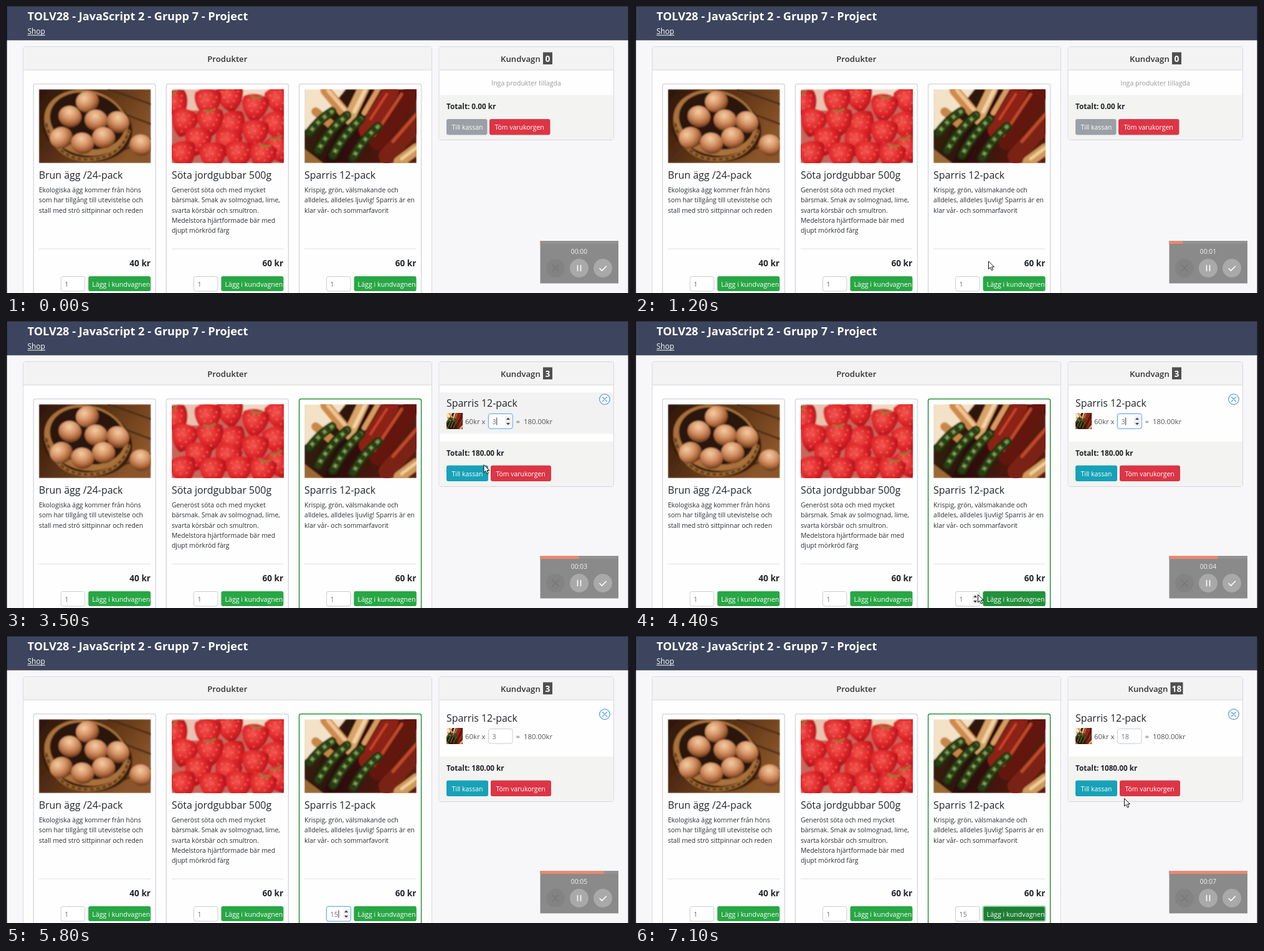
Write an HTML page that moves like this. It is 1000 by 462 pixels and loops after 7.2 s.

```html
<!DOCTYPE html>
<html lang="sv">
<head>
<meta charset="utf-8">
<title>Shop</title>
<style>
html, body { margin: 0; width: 100%; height: 100%; overflow: hidden; background: #f7f7fa; }
svg { display: block; width: 100vw; height: 100vh; }
text { font-family: "Open Sans", "Noto Sans", sans-serif; white-space: pre; }
</style>
</head>
<body>
<svg viewBox="0 0 1000 462">
  <defs>
    <clipPath id="photo"><rect width="180" height="119"/></clipPath>
    <filter id="soft"><feGaussianBlur stdDeviation=".9"/></filter>
    <linearGradient id="wood" x2="1" y2=".5"><stop stop-color="#2c1509"/><stop offset=".5" stop-color="#5b3215"/><stop offset="1" stop-color="#8a5529"/></linearGradient>
    <radialGradient id="egg" cx=".4" cy=".3" r=".7"><stop stop-color="#f3cda4"/><stop offset=".45" stop-color="#d8976a"/><stop offset=".75" stop-color="#b06b40"/><stop offset="1" stop-color="#6d3a1c"/></radialGradient>
    <radialGradient id="berry" cx=".4" cy=".35" r=".65"><stop stop-color="#f4574f"/><stop offset=".6" stop-color="#dd2428"/><stop offset="1" stop-color="#a8121a"/></radialGradient>
    <linearGradient id="pan" x2="1" y2=".3"><stop stop-color="#3d2a10"/><stop offset=".5" stop-color="#2a0d06"/><stop offset="1" stop-color="#5a1d0f"/></linearGradient>
  </defs>
  <g id="page"></g>
  <g id="live"></g>
</svg>
<script>
const INK = '#212529', GREEN = '#28a745';
const $ = id => document.getElementById(id);

const text = (x, y, s, size, fill = INK, weight = 400, anchor = 'start') =>
  `<text x="${x}" y="${y}" font-size="${size}" fill="${fill}" font-weight="${weight}" text-anchor="${anchor}">${s}</text>`;
const rect = (x, y, w, h, fill, more = '') =>
  `<rect x="${x}" y="${y}" width="${w}" height="${h}" fill="${fill}" ${more}/>`;
const box = (x, y, w, h, fill, edge, width = 1) =>
  rect(x, y, w, h, fill, `rx="3" stroke="${edge}" stroke-width="${width}"`);
const path = (d, stroke, width, more = '') =>
  `<path d="${d}" fill="none" stroke="${stroke}" stroke-width="${width}" stroke-linecap="round" ${more}/>`;
const oval = (x, y, rx, ry, fill, turn = 0) =>
  `<ellipse rx="${rx}" ry="${ry}" fill="${fill}" transform="translate(${x} ${y}) rotate(${turn})"/>`;
const button = (x, y, w, s, fill, pad = 8.5) =>
  rect(x, y, w, 25.5, fill, 'rx="3"') + text(x + pad, y + 17, s, 10.45, '#fff');

function eggs() {
  const list = [[78, 20, -15], [50, 44, 20], [92, 50, 15], [127, 53, 30],
    [36, 78, -20], [104, 78, 10], [70, 87, 15], [164, 90, 20]];
  return rect(0, 0, 180, 119, 'url(#wood)') +
    path('M112 0L180 24M132 38L180 56M100 112L180 80', '#4a2a12', 2.5) +
    oval(77, 60, 74, 55, '#3a1d0b', 14) + oval(76, 54, 68, 52, '#a9713a', 14) +
    oval(78, 51, 61, 45, '#2b1408', 14) +
    path('M12 56Q26 112 78 113Q130 112 144 68', '#a06b35', 6) +
    path('M12 56Q26 112 78 113Q130 112 144 68', '#54300f', 3, 'stroke-dasharray="4 6"') +
    list.map(([x, y, a]) => oval(x, y, 18.5, 17, 'url(#egg)', a)).join('');
}

function berries() {
  const list = [[6, 22], [172, 16], [94, 12], [58, 20], [134, 28], [20, 52], [98, 56], [168, 56],
    [62, 50], [134, 70], [42, 82], [90, 84], [172, 94], [18, 104], [66, 106], [108, 104], [146, 106]];
  return rect(0, 0, 180, 119, '#c9655a') + rect(0, 0, 44, 34, '#e9c3b0') + rect(105, 0, 75, 16, '#efd9c4') +
    list.map(([x, y], i) => `<g transform="translate(${x} ${y}) rotate(${i * 47 % 40 - 20}) scale(1.25)">` +
      '<path d="M0 21C-14 14-20-4-16-12Q0-21 16-12C20-4 14 14 0 21Z" fill="url(#berry)"/>' +
      path('M-10-7h.1M-3-9h.1M4-9h.1M11-6h.1M-8 0h.1M0-2h.1M8 0h.1M-4 6h.1M4 6h.1M0 13h.1', '#f3937a', 1.5) +
      (i % 4 ? '' : path('M-7-13L0-11L7-14', '#6f8638', 2)) + '</g>').join('');
}

function asparagus() {
  const stalk = (x, y, dx, dy) => {
    const d = `M${x} ${y}q${dx * .4} ${dy * .6} ${dx} ${dy}`;
    return path(d, '#1f3010', 15) + path(d, '#55742f', 8) +
      path(d, '#93a960', 3) + path(d, '#2a3d18', 8, 'stroke-dasharray="1 13"');
  };
  return rect(0, 0, 180, 119, 'url(#pan)') +
    '<path d="M0 0H66L34 40L0 66Z" fill="#f3e2c8"/><path d="M0 96L30 119H0Z" fill="#9a6a34"/>' +
    path('M18 36L44 58', '#c98746', 14) + path('M34 2L74 50', '#cf8a4c', 17) + path('M38 2L72 42', '#edc592', 6) +
    path('M94 0L72 46', '#d9a468', 18) + path('M98 0L80 36', '#f0d3a6', 6) +
    path('M138 4L100 66', '#8c2013', 26) + path('M172 4L118 84', '#64170d', 28) +
    path('M180 54L132 108', '#7a2412', 26) + path('M118 0L96 38', '#d99a5e', 8) +
    path('M156 8L112 74M180 40L142 84', '#c04a2b', 5) + path('M132 8L106 48', '#c8452c', 4) +
    stalk(8, 70, 36, -34) + stalk(22, 98, 46, -56) + stalk(46, 106, 44, -58) + stalk(78, 110, 40, -50) +
    path('M152 117L180 96', '#cf9a5c', 18) + path('M156 112L180 94', '#efcf9c', 5);
}

const photos = [eggs, berries, asparagus];
const products = [
  ['Brun ägg /24-pack', 40, 'Ekologiska ägg kommer från höns|som har tillgång till utevistelse och|stall med strö sittpinnar och reden'],
  ['Söta jordgubbar 500g', 60, 'Generöst söta och med mycket|bärsmak. Smak av solmognad, lime,|svarta körsbär och smultron.|Medelstora hjärtformade bär med|djupt mörkröd färg'],
  ['Sparris 12-pack', 60, 'Krispig, grön, välsmakande och|alldeles, alldeles ljuvlig! Sparris är en|klar vår- och sommarfavorit']
];

const cardX = i => 44.2 + 213.2 * i;

function card([name, price, about], i) {
  const x = cardX(i), left = x + 8.5, right = x + 187.8;
  return box(x, 125.5, 196, 360, '#fefefe', '#d6d7de', 1.4) +
    `<g id="photo${i}" transform="translate(${left} 134)"><g clip-path="url(#photo)"><g filter="url(#soft)">${photos[i]()}</g></g></g>` +
    text(left, 278, name, 15.95) +
    about.split('|').map((s, n) => text(left, 300 + 16.3 * n, s, 10.45, '#2b2f33')).join('') +
    rect(left, 390.5, 179.5, 1, '#e0e0e2') +
    text(right, 419, price + ' kr', 13.6, INK, 700, 'end') +
    field(x + 44, 435.5, 1) + buyButton(i, GREEN);
}

function buyButton(i, fill, more = '') {
  const x = cardX(i) + 88;
  return rect(x, 435, 100, 24, fill, 'rx="3" ' + more) + text(x + 6, 452, 'Lägg i kundvagnen', 10.7, '#fff');
}

function field(x, y, value, focus, arrows) {
  const w = 38.5, s = String(value), ax = x + w - 7;
  return (focus ? box(x, y, w, 23.5, 'none', '#cfe4fb', 3) : '') +
    box(x, y, w, 23.5, '#fff', focus ? '#6faee8' : '#c9cdd2') +
    text(x + 6, y + 16.5, s, 10.8, '#6a7178') +
    (focus ? rect(x + 6.5 + 6.2 * s.length, y + 6, 1, 12, '#333') : '') +
    (arrows ? rect(ax - 5, y + 4, 10, 16, '#efefef') +
      `<path d="M${ax - 3} ${y + 9.5}l3-3.5 3 3.5zM${ax - 3} ${y + 14.5}l3 3.5 3-3.5z" fill="#444"/>` : '');
}

$('page').innerHTML = rect(0, 0, 1000, 462, '#f7f7fa') + rect(0, 0, 1000, 55, '#3c455d') +
  rect(0, 55, 1000, 1, '#c9ccd6') + rect(0, 0, 1000, 1, '#23283a') +
  rect(0, 0, 1.5, 462, '#0c0c10') + rect(998.6, 0, 1.4, 462, '#15161c') +
  text(34.5, 23, 'TOLV28 - JavaScript 2 - Grupp 7 - Project', 18.15, '#fff', 700) +
  text(34.5, 45, 'Shop', 11.9, '#fff') + rect(34.5, 46.5, 28.5, 1, '#fff') +
  box(27.5, 65.5, 656, 420, '#fefefe', '#d9dade') + rect(28, 66, 655, 37, '#f3f3f3') +
  rect(28, 102.5, 655, 1, '#d9dade') + text(355.3, 90, 'Produkter', 13.2, '#333', 600, 'middle') +
  products.map(card).join('');

function cart(t, count) {
  const full = count > 0, foot = full ? 194 : 143.5, end = full ? 266.5 : 215.5;
  const bw = count > 9 ? 20 : count === 1 ? 12 : 15, start = 835.5 - (68 + bw) / 2;
  const sum = (count * 60).toFixed(2), y = foot + 38.5;
  let out = box(695, 65.5, 280.5, end - 65.5, '#fefefe', '#d5d6da') +
    rect(695.5, 66, 279.5, 37, '#f3f3f3') + rect(695.5, 102.5, 279.5, 1, '#d9dade') +
    rect(695.5, foot, 279.5, end - foot - .5, '#f3f3f2') +
    text(start, 90, 'Kundvagn', 13.2, '#333', 600) + rect(start + 68, 74.5, bw, 19.5, '#4f4f4f') +
    text(start + 68 + bw / 2, 90, count, 13.8, '#fff', 700, 'middle') +
    text(707, foot + 22.5, `Totalt: ${sum} kr`, 11.7, INK, 700) +
    (full ? button(707, y, 67, 'Till kassan', '#17a2b8') + button(778, y, 97, 'Töm varukorgen', '#dc3545')
          : button(707, y, 65.5, 'Till kassan', '#9aa0a6') + button(776, y, 97.5, 'Töm varukorgen', '#dc3545'));
  if (!full) return out + text(835, 128, 'Inga produkter tillagda', 10.55, '#9a9a9a', 400, 'middle');
  const focus = t >= 2600 && t < 4600;
  return out + (t >= 2200 && t < 3600 ? rect(695.5, 115, 279.5, 66.5, '#f2f2f2') : '') +
    text(707, 138, 'Sparris 12-pack', 15.9) +
    '<g transform="translate(707 148) scale(.1456 .2185) translate(-479.1 -134)"><use href="#photo2"/></g>' +
    text(737, 166, '60kr x', 11.4, '#555') + field(774.5, 149.5, count, focus, focus) +
    text(818.5, 166, '=', 11.4, '#555') + text(831, 166, sum + 'kr', 11.4, '#555') +
    '<circle cx="961" cy="126" r="8.3" fill="#f8fbfe" stroke="#5c9fd6" stroke-width="1.3"/>' +
    path('M957.5 122.5l7 7m0-7l-7 7', '#5c9fd6', 1.2);
}

function thirdCard(t) {
  if (t < 1800) return '';
  const x = cardX(2), focused = t < 2600 || t >= 6400;
  const hover = (t >= 4100 && t < 4500) || (t >= 6200 && t < 6400);
  return box(x, 125.5, 196, 360, 'none', '#2b9a3f', 1.5) +
    field(x + 44, 435.5, t < 5400 ? 1 : 15, t >= 4600 && t < 6400, t >= 4300 && t < 6200) +
    (focused ? buyButton(2, '#1e7e34', 'stroke="#93d3a2" stroke-width="2"') : buyButton(2, hover ? '#23913c' : GREEN));
}

function recorder(t) {
  const disc = (x, fill) => `<circle cx="${x}" cy="422" r="15" fill="${fill}"/>`;
  return rect(857.5, 378, 125.5, 68.5, '#8a8a8a') + rect(857.5, 378, 125.5, 5, '#929292') +
    rect(857.5, 378, Math.min(125.5, 1 + t * .0175), 5, '#ea8871') +
    text(920, 398.5, '00:0' + Math.floor(t / 1000), 10.3, '#f4f4f4', 400, 'middle') +
    disc(882, '#838383') + disc(920, '#a9a9a9') + disc(958, '#a9a9a9') +
    path('M877 417l10 10m0-10l-10 10', '#767676', 1.5) +
    path('M917.5 417.5v9m5-9v9', '#fff', 1.6) + path('M953 422.5l3.5 3.5 7-7', '#fff', 1.6);
}

// time, x, y of the pointer tip
const track = [[800, 620, 470], [1200, 567.5, 411], [1600, 600, 447], [1900, 600, 447], [2500, 806, 158],
  [3100, 806, 158], [3500, 767, 231.5], [4100, 600, 441], [4400, 550.5, 440.5], [5000, 548, 444],
  [5900, 548, 444], [6200, 600, 447], [6500, 600, 447], [7100, 785.5, 261.5]];

function pointer(t) {
  if (t < 800 || (t >= 2200 && t < 2400) || (t >= 5000 && t < 6000)) return '';
  const i = Math.max(1, track.findIndex(k => k[0] >= t));
  const [a, b] = [track[i - 1], track[i]];
  const u = (t - a[0]) / (b[0] - a[0]), e = u * u * (3 - 2 * u);
  const x = a[1] + (b[1] - a[1]) * e, y = a[2] + (b[2] - a[2]) * e;
  return `<path transform="translate(${x} ${y})" d="M0 0V12.5L2.9 9.8L5 14.6L7.2 13.6L5.1 9H9Z" fill="#fff" stroke="#111"/>`;
}

function count(t) {
  return t < 1800 ? 0 : t < 2700 ? 1 : t < 3000 ? 2 : t < 6400 ? 3 : 18;
}

let last = -1;
function frame() {
  const t = Math.floor(performance.now() % 7200 / 100) * 100;
  if (t !== last) {
    last = t;
    $('live').innerHTML = cart(t, count(t)) + thirdCard(t) + recorder(t) + pointer(t);
  }
  requestAnimationFrame(frame);
}
frame();
</script>
</body>
</html>
```
